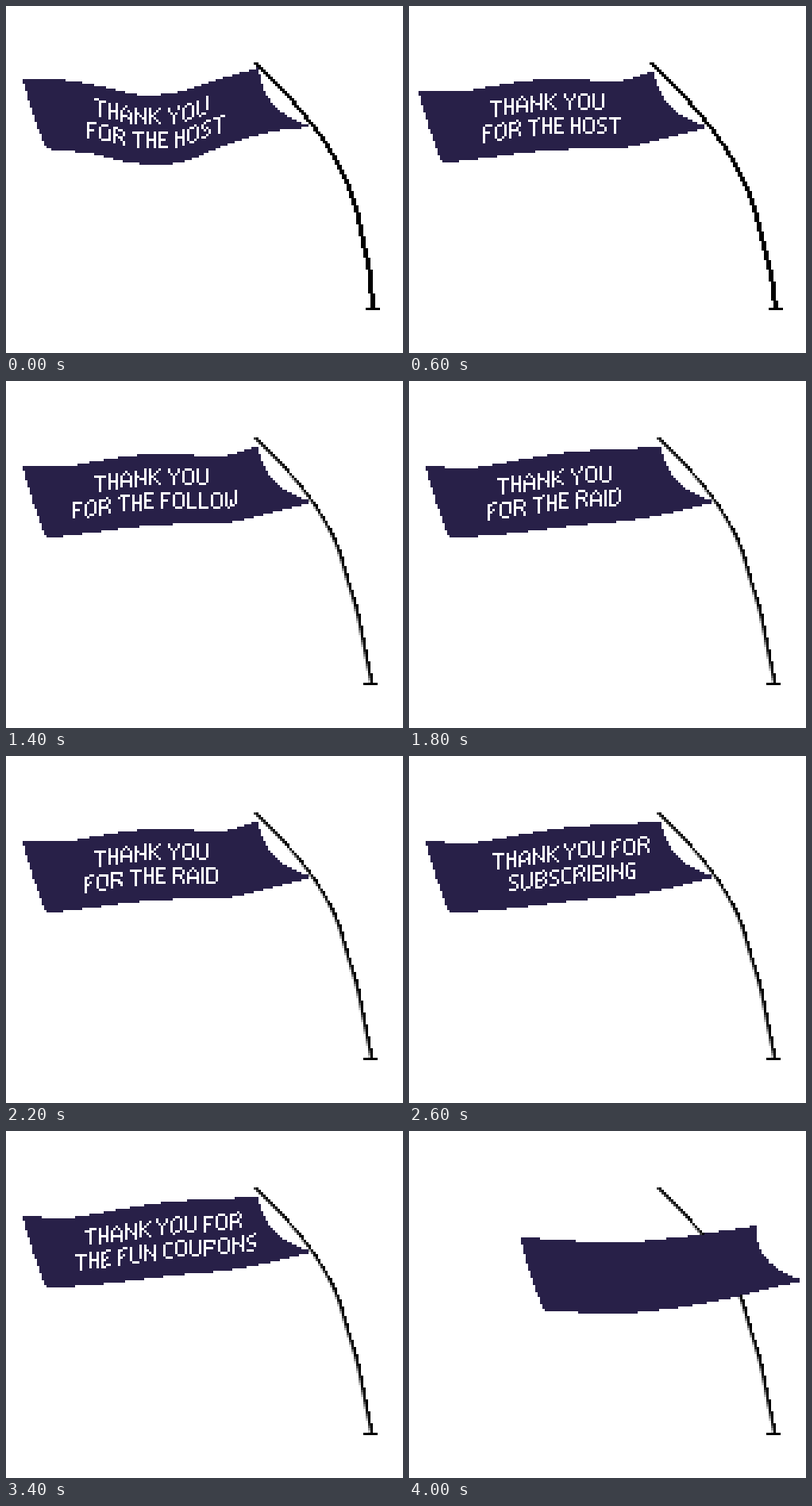
Recreate the animation shown at these times as an HTML page with a canvas. Size 500 by 437 pixels, loop 4100 ms.

```html
<!DOCTYPE html>
<html lang="en">
<head>
<meta charset="utf-8">
<title>Thank-you flag</title>
<style>
  html, body { margin: 0; width: 100%; height: 100%; overflow: hidden; background: #fff; }
  canvas { display: block; }
</style>
</head>
<body>
<canvas id="stage" width="500" height="437" aria-label="A waving flag with thank-you messages"></canvas>
<script>
const ctx = document.getElementById('stage').getContext('2d');
const CELL = 3, STEP_MS = 100, STEPS = 41, WAVE_STEPS = 8;

// Heights of the flag's top and bottom edge, evenly spaced from left to right
const POSES = {
  dip:   { top: [91, 93, 101, 112, 108, 92, 78],     bottom: [180, 186, 198, 197, 176, 159, 152] },
  rise:  { top: [106, 110, 103, 94, 88, 86, 82],     bottom: [198, 194, 188, 181, 176, 166, 152] },
  crest: { top: [106, 108, 100, 93, 92, 95, 82],     bottom: [198, 191, 184, 180, 179, 167, 152] },
  loose: { top: [134, 137, 140, 139, 134, 127, 119], bottom: [226, 229, 229, 223, 214, 201, 188] }
};

// Pole x positions, evenly spaced from tip to foot
const POLE_TOP = 72, POLE_FOOT = 380;
const SWAYING_POLE = [315, 358, 394, 421, 439, 449, 458, 462];
const STILL_POLE = [315, 358, 392, 416, 430, 443, 452, 461];

// Two lines per message, each with its first column
const MESSAGES = [
  [['THANK YOU', 37], ['FOR THE HOST', 34]],
  [['THANK YOU', 37], ['FOR THE FOLLOW', 28]],
  [['THANK YOU', 37], ['FOR THE RAID', 33]],
  [['THANK\u2009YOU FOR', 35], ['SUBSCRIBING', 42]],
  [['THANK\u2009YOU FOR', 33], ['THE FUN COUPONS', 29]]
];

// Letter strokes on a grid seven rows tall
const GLYPHS = {
  A: 'M0 6V2L2 0L4 2V6M0 4H4',
  B: 'M0 0H3L4 1V2L3 3H0M3 3L4 4V5L3 6H0V0',
  C: 'M3 0H1L0 1V5L1 6H3',
  D: 'M0 0H3L4 1V5L3 6H0Z',
  E: 'M3 0H0V6H3M0 3H2',
  F: 'M3 0H0V6M0 3H2',
  G: 'M3 0H1L0 1V5L1 6H3V3H2',
  H: 'M0 0V6M3 0V6M0 3H3',
  I: 'M0 0V6',
  K: 'M0 0V6M4 0L1 3L4 6',
  L: 'M0 0V6H3',
  N: 'M0 0V6M0 1L4 5M4 0V6',
  O: 'M1 0H3L4 1V5L3 6H1L0 5V1Z',
  P: 'M0 6V0H3L4 1V2L3 3H0',
  R: 'M0 6V0H3L4 1V2L3 3H0M2 3L4 5V6',
  S: 'M3 0H1L0 1V2L1 3H2L3 4V5L2 6H0',
  T: 'M0 0H4M2 0V6',
  U: 'M0 0V5L1 6H3L4 5V0',
  W: 'M0 0V5L1 6L2 5L3 6L4 5V0M2 3V5',
  Y: 'M0 0V1L2 3L4 1V0M2 3V6'
};
const glyphWidth = ch => ch === 'I' ? 1 : 'CEFGHLS'.includes(ch) ? 4 : 5;

function cell(x, y, color, width = 1) {
  ctx.fillStyle = color;
  ctx.fillRect(x * CELL, y * CELL - 1, width * CELL, CELL);
}

// Catmull-Rom curve through evenly spaced values, t from 0 to 1
function curve(values, t) {
  const last = values.length - 1;
  const pos = Math.min(Math.max(t, 0), 1) * last;
  const i = Math.min(Math.floor(pos), last - 1), f = pos - i;
  const b = values[i], c = values[i + 1];
  const a = values[i - 1] ?? 2 * b - c, d = values[i + 2] ?? 2 * c - b;
  return b + f / 2 * (c - a + f * (2 * a - 5 * b + 4 * c - d + f * (3 * (b - c) + d - a)));
}

function mix(a, b, t) {
  const blend = edge => a[edge].map((y, i) => y + (b[edge][i] - y) * t);
  return { top: blend('top'), bottom: blend('bottom') };
}

function wavePose(phase) {
  const { dip, rise, crest } = POSES;
  if (phase < 2) return mix(dip, rise, phase / 2);
  if (phase < 6) return mix(rise, crest, (phase - 2) / 4);
  return mix(crest, dip, (phase - 6) / 2);
}

function drawPole(shift, still) {
  const xs = still ? STILL_POLE : SWAYING_POLE;
  for (let row = 24; row <= 126; row++) {
    const t = (row * CELL - POLE_TOP) / (POLE_FOOT - POLE_TOP);
    const x = (curve(xs, t) + shift * (1 - t * t)) / CELL;
    if (still) {
      const left = Math.floor(x - 0.75), cover = 1 - (x - 0.75 - left);
      cell(left, row, `rgba(0,0,0,${cover})`);
      cell(left + 1, row, '#000');
    } else {
      cell(Math.round(x - 1), row, '#000', 2);
    }
  }
  cell(still ? 150 : 151, 127, '#000', 6);
}

function drawFlag({ top, bottom }, shift, tip) {
  const x0 = 21 + shift, x1 = 318 + shift, foot = 51 + shift;
  const path = new Path2D();
  for (let t = 0; t <= 1; t += 1 / 64) path.lineTo(x0 + (x1 - x0) * t, curve(top, t));
  path.quadraticCurveTo(tip - 62, bottom[6] - 16, tip, bottom[6]);
  for (let t = 1; t >= 0; t -= 1 / 64) path.lineTo(foot + (tip - foot) * t, curve(bottom, t));
  path.quadraticCurveTo(x0 + 11, (top[0] + bottom[0]) / 2, x0, top[0]);
  for (let y = 24; y < 80; y++) {
    for (let x = 0; x < 167; x++) {
      if (ctx.isPointInPath(path, (x + 0.5) * CELL, (y + 0.5) * CELL - 1)) cell(x, y, '#282048');
    }
  }
}

function drawLine(text, column, rowOffset, pose, shift) {
  ctx.lineWidth = 0.9;
  ctx.lineCap = 'square';
  ctx.lineJoin = 'round';
  for (const ch of text) {
    if (!GLYPHS[ch]) {
      column += ch === ' ' ? 2 : 1;
      continue;
    }
    const path = new Path2D(GLYPHS[ch]), width = glyphWidth(ch);
    for (let x = 0; x < width; x++) {
      const px = (column + x + 0.5) * CELL;
      const middle = (curve(pose.top, (px - 21) / 297) + curve(pose.bottom, (px - 51) / 336)) / 2;
      const row = Math.round((middle - 25.5) / CELL) + rowOffset;
      for (let y = 0; y < 7; y++) {
        if (ctx.isPointInStroke(path, x, y)) cell(column + x + shift / CELL, row + y, '#fff');
      }
    }
    column += width + 1;
  }
}

function draw(step) {
  const message = MESSAGES[Math.floor(step / WAVE_STEPS)];
  const phase = step % WAVE_STEPS;
  const still = step >= WAVE_STEPS;
  const sway = still ? 0 : -CELL * Math.round(Math.min(3, 4.2 * Math.sin(Math.PI * phase / WAVE_STEPS)));

  ctx.fillStyle = '#fff';
  ctx.fillRect(0, 0, 500, 437);
  drawPole(sway, still);
  if (!message) {
    drawFlag(POSES.loose, 119, 498);
    return;
  }
  const pose = wavePose(phase);
  drawFlag(pose, sway, 387 + sway);
  message.forEach(([text, column], i) => drawLine(text, column, i * 10, pose, sway));
}

let shown = -1;
function tick() {
  const step = Math.floor(performance.now() / STEP_MS) % STEPS;
  if (step !== shown) draw(shown = step);
  requestAnimationFrame(tick);
}
tick();
</script>
</body>
</html>
```
